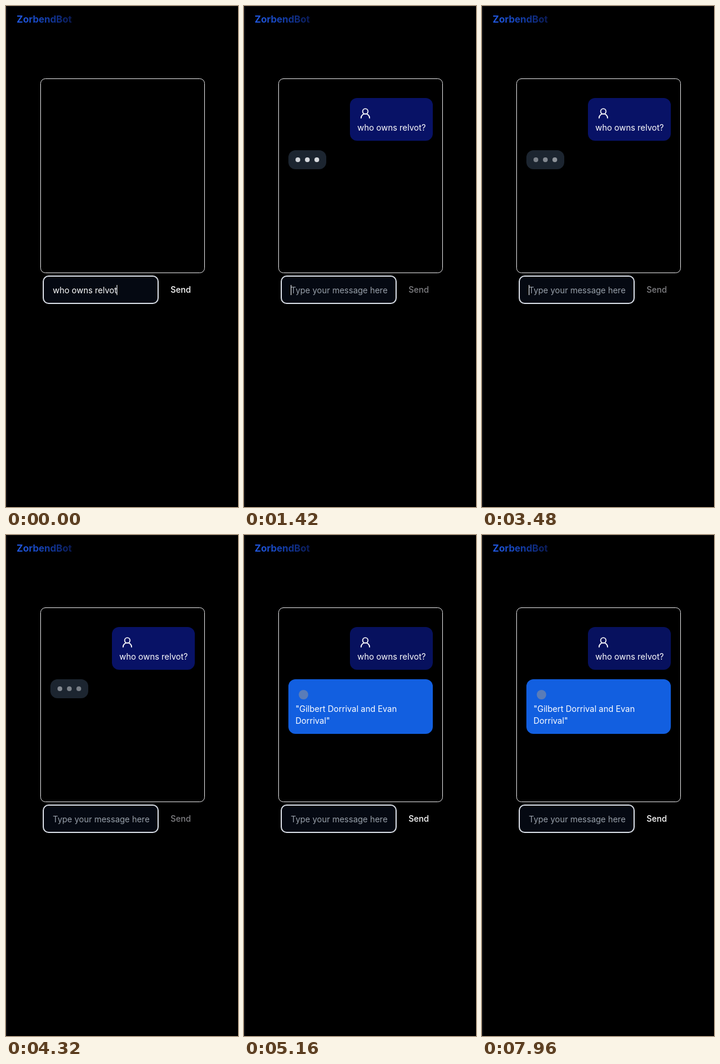
An HTML page with a canvas that plays this animation: 392 by 844 pixels, repeating every 8 s.

```html
<!DOCTYPE html>
<html lang="en">
<head>
<meta charset="utf-8">
<title>Chat</title>
<style>
  html, body { margin: 0; width: 100%; height: 100%; overflow: hidden; background: #000; }
  canvas { display: block; }
</style>
</head>
<body>
<canvas id="stage" width="392" height="844"></canvas>
<script>
const ctx = document.getElementById('stage').getContext('2d');
const LOOP = 8000;
const TYPED = 120, SENT = 960, ANSWERED = 5060;
const BLINK = 1400, PULSE = 5600, STAGGER = 280;
const QUESTION = 'who owns relvot?';
const ANSWER = ['"Gilbert Dorrival and Evan', 'Dorrival"'];

function box(x, y, w, h, r, fill, stroke, line = 1) {
  ctx.beginPath();
  ctx.roundRect(x, y, w, h, r);
  if (fill) { ctx.fillStyle = fill; ctx.fill(); }
  if (stroke) { ctx.strokeStyle = stroke; ctx.lineWidth = line; ctx.stroke(); }
}

function disc(x, y, r, fill) {
  ctx.beginPath();
  ctx.arc(x, y, r, 0, 7);
  ctx.fillStyle = fill;
  ctx.fill();
}

function text(str, x, y, fill, weight = 400, size = 14) {
  ctx.font = `${weight} ${size}px Inter, sans-serif`;
  ctx.fillStyle = fill;
  ctx.fillText(str, x, y);
  return ctx.measureText(str).width;
}

// Opacity falls from 1 to 0.5 and back, eased at both ends
function pulse(t) {
  const p = Math.max(0, t) % PULSE / PULSE * 2;
  const u = p < 1 ? p : 2 - p;
  return 1 - 0.5 * u * u * (3 - 2 * u);
}

function frame() {
  ctx.fillStyle = '#000';
  ctx.fillRect(0, 0, 392, 844);
  ctx.fillStyle = '#0f0f12';
  ctx.fillRect(0, 0, 392, 1);
  ctx.fillRect(0, 0, 2, 844);

  const blue = ctx.createLinearGradient(18, 0, 112, 0);
  blue.addColorStop(0, '#2158e0');
  blue.addColorStop(0.5, '#143fae');
  blue.addColorStop(1, '#0a1a55');
  text('ZorbendBot', 18, 28, blue, 700, 16);

  box(58.5, 122.5, 277, 327, 8, null, '#e2e2e4');
}

function userBubble(answered) {
  box(179, 155, 140, 72, 12, answered ? '#07115e' : '#081266');
  ctx.strokeStyle = '#fff';
  ctx.lineWidth = 1.7;
  ctx.lineCap = 'round';
  ctx.beginPath();
  ctx.arc(205, 177.5, 4.5, 0, 7);
  ctx.moveTo(197.8, 188.7);
  ctx.arc(205, 188.7, 7.2, Math.PI, 0);
  ctx.stroke();
  text(QUESTION, 191.5, 210, '#fff');
}

function typingBubble(t) {
  box(75, 243, 64, 32, 12, '#1c2530');
  for (let i = 0; i < 3; i++) {
    ctx.globalAlpha = pulse(t - i * STAGGER);
    disc(91 + i * 16, 259, 4, '#d6d9de');
  }
  ctx.globalAlpha = 1;
}

function answerBubble() {
  box(75, 243, 244, 92, 12, '#125fe0');
  disc(100.5, 269, 8, '#5a7cb8');
  ANSWER.forEach((line, i) => text(line, 87, 298 + i * 20, '#fff'));
}

function inputRow(t, waiting) {
  box(63, 455, 194, 46, 9, '#050912', '#d5dae2', 2);
  let caret = 79;
  if (t < SENT) {
    caret += text(t < TYPED ? QUESTION.slice(0, -1) : QUESTION, 79, 484, '#fff');
  } else {
    text('Type your message here', 79, 484, '#98a0aa');
  }
  if (t < TYPED || Math.floor((t - TYPED) / BLINK) % 2 === 0) {
    ctx.fillStyle = '#fff';
    ctx.fillRect(Math.round(caret), 470, 1, 17);
  }
  text('Send', 278, 483, waiting ? '#808084' : '#fff', 500);
}

function draw(now) {
  const t = now % LOOP;
  const sent = t >= SENT, answered = t >= ANSWERED;
  frame();
  if (sent) {
    userBubble(answered);
    if (answered) answerBubble();
    else typingBubble(t - SENT);
  }
  inputRow(t, sent && !answered);
}

let start;
function tick(now) {
  start ??= now;
  draw(now - start);
  requestAnimationFrame(tick);
}
draw(0);
requestAnimationFrame(tick);
</script>
</body>
</html>
```
